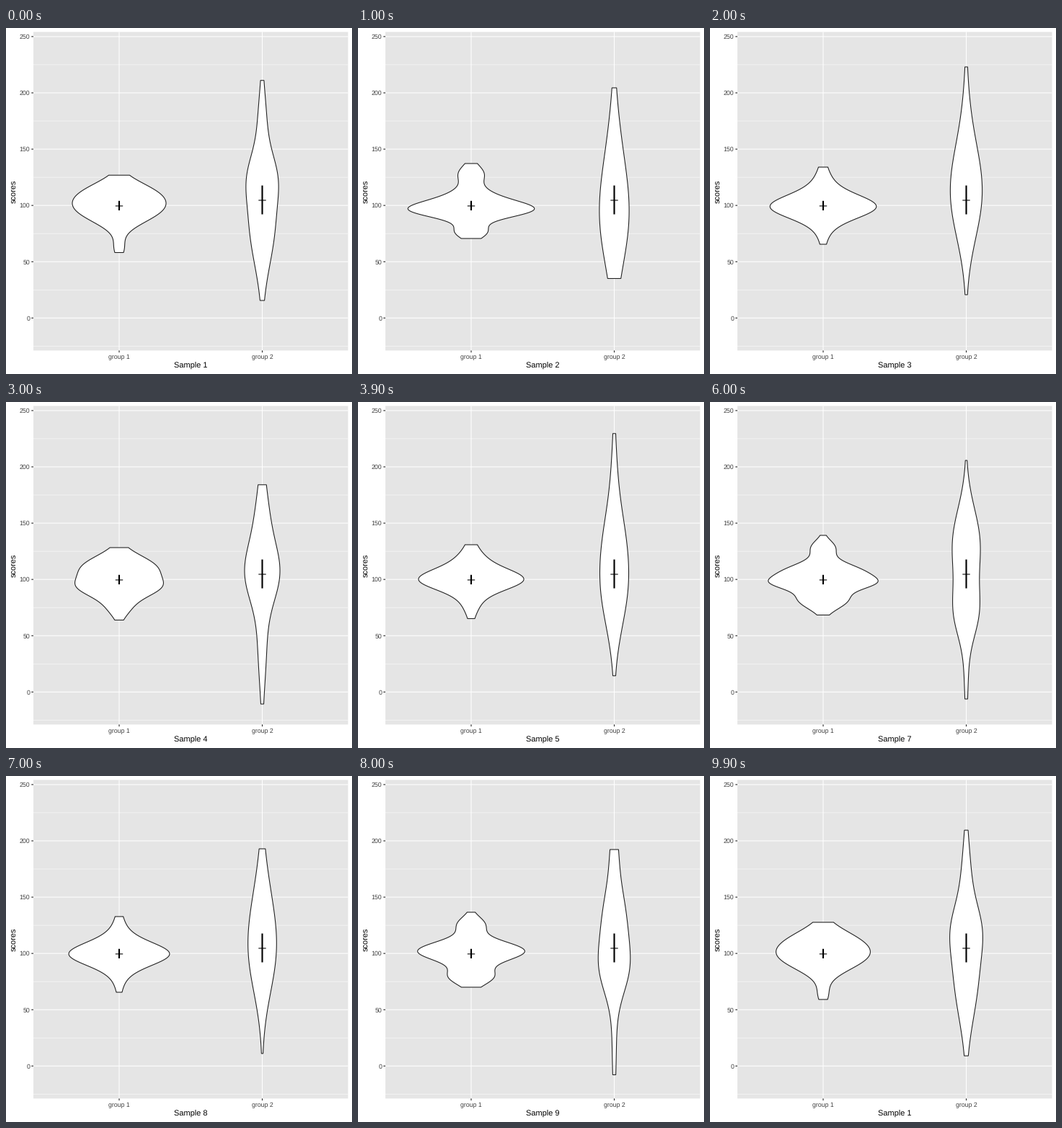
A matplotlib script that plays this animation: 480x480 px, repeating every 10000 ms.

```python
import numpy as np
import matplotlib
import matplotlib.pyplot as plt
from matplotlib.animation import FuncAnimation
from matplotlib.patches import Polygon, Rectangle

matplotlib.rcParams["font.family"] = "Liberation Sans"
matplotlib.rcParams["text.hinting"] = "none"
matplotlib.rcParams["path.snap"] = False

SIZE, DPI = 480, 72
LEFT, RIGHT, TOP, BOTTOM = 38.0, 474.5, 5.5, 447.4
CENTERS = (157.0, 355.5)
PER_STATE, HOLD = 10, 5          # frames per sample, last still frame
STEPS = PER_STATE - HOLD
LINE = 1.07
INK, TEXT = "#1f1f1f", "#404040"


def score_y(score):
    return 402.3 - 1.5616 * score


def density(top, bottom, *bumps):
    """Trimmed density: half-width as a sum of (height, center, spread) bells."""
    y = np.linspace(top, bottom, 256)
    w = sum(h * np.exp(-0.5 * ((y - c) / s) ** 2) for h, c, s in bumps)
    return np.array([w, y])


def mix(a, b, t):
    return a + (b - a) * t


# One pair per sample: group 1, group 2 (pixels)
samples = [
    (density(204.2, 311.5, (53, 252, 19), (31, 226, 16), (6.3, 306, 12)),
     density(72.7, 378, (17.5, 270, 58), (11, 205, 32), (5.3, 130, 45))),
    (density(188, 292, (68, 253, 10.8), (32, 238, 14), (17, 202, 12),
             (21.5, 283, 9.5)),
     density(83, 347.5, (19.3, 262, 70), (4.6, 155, 65))),
    (density(193, 300, (52, 248, 15), (22, 243, 32)),
     density(54, 370, (20, 232, 62), (4, 150, 70))),
    (density(202, 302.5, (43, 258, 13), (50, 230, 17), (14.5, 284, 14)),
     density(114.8, 419, (17, 240, 38), (10.3, 178, 58), (5.8, 335, 58))),
    (density(197, 300, (54, 245, 13), (22, 244, 32)),
     density(26, 370, (20, 240, 60), (4, 150, 75))),
    (density(205, 310, (67, 248, 15), (27.5, 213, 14), (11, 275, 11),
             (6, 300, 14)),
     density(96, 396, (20.5, 270, 52), (15.5, 160, 36))),
    (density(185, 295.5, (37, 252, 8.5), (55, 237, 13), (34, 274, 13),
             (16, 202, 10.5)),
     density(81, 412, (19, 198, 50), (14.8, 293, 36), (2.3, 385, 40))),
    (density(195, 300, (52, 247, 15), (18, 244, 32)),
     density(101, 385, (17, 245, 60), (6, 165, 60))),
    (density(189, 293, (74, 243, 13.5), (30, 278.5, 11.5), (18.5, 206, 11)),
     density(102, 414.5, (15, 270, 36), (15.5, 200, 48), (4, 100, 35),
             (2.8, 370, 60))),
    (density(198, 304, (70, 244, 21), (8, 196, 14), (6, 296, 14)),
     density(85, 429, (24, 236, 62), (5, 355, 50), (2, 95, 35))),
]
COUNT = len(samples)

fig = plt.figure(figsize=(SIZE / DPI, SIZE / DPI), dpi=DPI, facecolor="white")
ax = fig.add_axes([0, 0, 1, 1])
ax.set_xlim(0, SIZE)
ax.set_ylim(SIZE, 0)
ax.axis("off")


def line(xs, ys, color, width, z=2):
    ax.plot(xs, ys, color=color, lw=width, solid_capstyle="butt", zorder=z)


def label(x, y, text, ha="center", size=8.8, color=TEXT, **kw):
    return ax.text(x, y, text, size=size, color=color, ha=ha,
                   **{"va": "baseline", **kw})


ax.add_patch(Rectangle((LEFT, TOP), RIGHT - LEFT, BOTTOM - TOP,
                       fc="#e5e5e5", lw=0, zorder=0))
for score in range(-25, 251, 25):
    y = score_y(score)
    major = score % 50 == 0
    line([LEFT, RIGHT], [y, y], "white", LINE if major else LINE / 2, 1)
    if major:
        line([LEFT - 2.75, LEFT], [y, y], INK, LINE)
        label(LEFT - 4.9, y + 3.2, str(score), ha="right")

violins = []
for k, x in enumerate(CENTERS):
    line([x, x], [TOP, BOTTOM], "white", LINE, 1)
    line([x, x], [BOTTOM, BOTTOM + 2.75], INK, LINE)
    label(x, 458.8, f"group {k + 1}")
    violins.append(ax.add_patch(Polygon([[0, 0]], closed=True, fc="white",
                                        ec=INK, lw=LINE, zorder=3)))

# Mean marks with their intervals
for x, mean, low, high in ((CENTERS[0], 246.9, 253, 239.8),
                           (CENTERS[1], 239, 258.5, 218.5)):
    line([x, x], [low, high], "black", 2.13, 4)
    line([x - 5.2, x + 5.2], [mean, mean], "black", LINE, 4)

label(16.8, (TOP + BOTTOM) / 2, "scores", ha="right", size=11, color="black",
      rotation=90, va="center")
title = label((LEFT + RIGHT) / 2, 472, "", size=11, color="black")


def update(frame):
    state, step = divmod(frame, PER_STATE)
    after = (state + 1) % COUNT
    t = max(0, step - HOLD) / STEPS
    for violin, x, a, b in zip(violins, CENTERS, samples[state], samples[after]):
        w, y = mix(a, b, t)
        violin.set_xy(np.column_stack([np.r_[x - w, (x + w)[::-1]],
                                       np.r_[y, y[::-1]]]))
    title.set_text(f"Sample {(after if t > 0.5 else state) + 1}")
    return [*violins, title]


anim = FuncAnimation(fig, update, frames=COUNT * PER_STATE, interval=100,
                     repeat=True, repeat_delay=0, blit=False)
plt.show()
```
